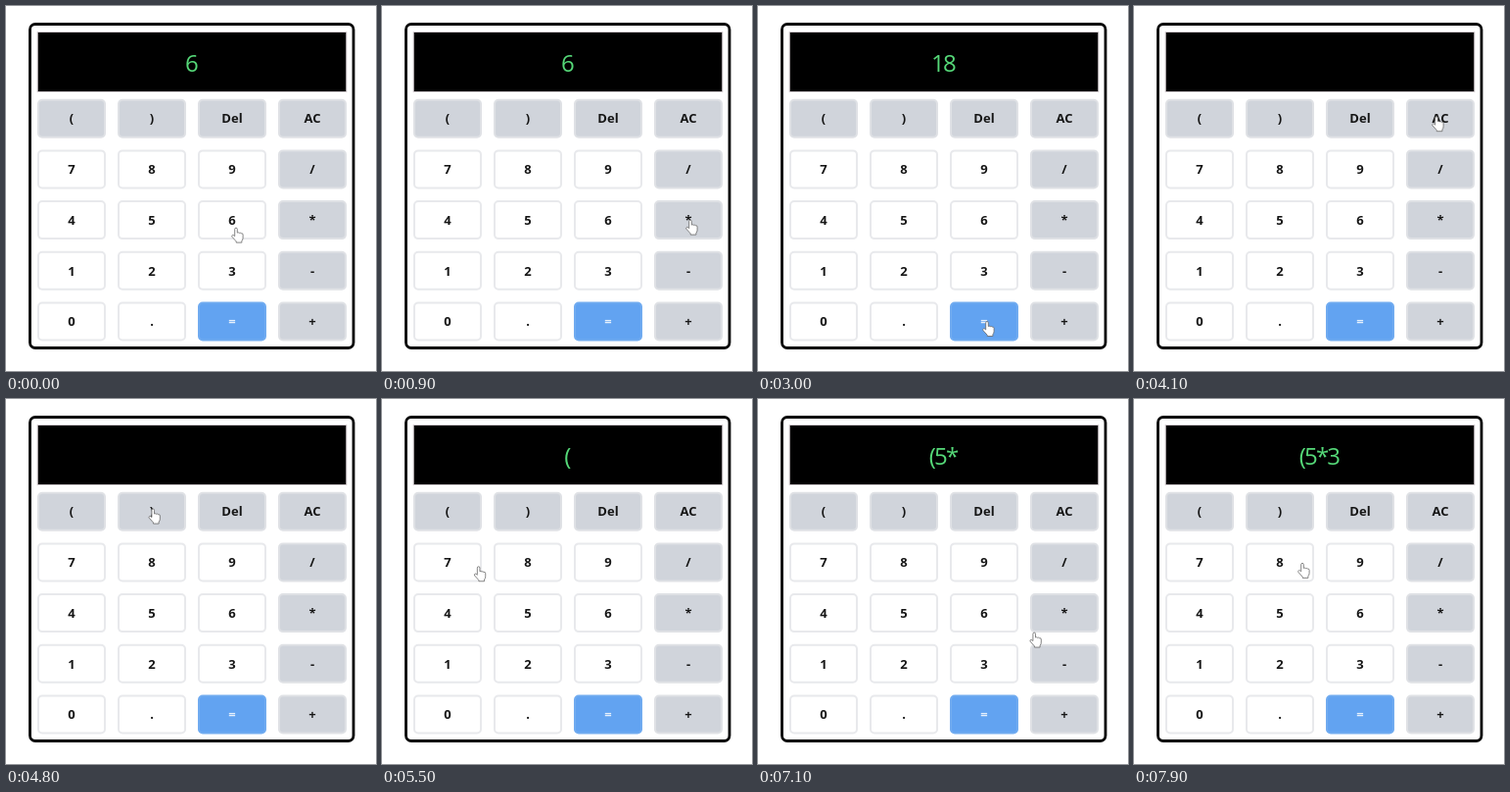
These frames come from a looping animation (378 by 372 pixels, 8 s). An HTML page:

```html
<!DOCTYPE html>
<html lang="en">
<head>
<meta charset="utf-8">
<title>Calculator</title>
<style>
  html, body { margin: 0; width: 100%; height: 100%; overflow: hidden; background: #fff; }
  svg { display: block; width: 100vw; height: 100vh; }
  text { font-family: "Open Sans", "Noto Sans", sans-serif; text-anchor: middle; }
  .frame { fill: #fff; stroke: #000; stroke-width: 2.8; }
  .screen { fill: #000; stroke: #d3ccd0; }
  #readout { font-size: 24px; letter-spacing: -1.8px; fill: #55d878; }
  .key rect { fill: #fff; stroke: #e8e9ec; stroke-width: 2; }
  .key text { font-size: 13px; font-weight: 700; fill: #161616; }
  .key.gray rect { fill: #d0d4db; stroke: #dfe1e5; }
  .key.blue rect { fill: #62a3f1; stroke: #70abf0; }
  .key.blue text { fill: #e4effc; }
  #cursor path { fill: #fff; stroke: #666; stroke-width: .8; stroke-linejoin: round; }
</style>
</head>
<body>
<svg viewBox="0 0 378 372">
  <rect class="frame" x="24.5" y="18.5" width="330.5" height="330" rx="5.5"/>
  <rect class="screen" x="32.2" y="26.5" width="315.6" height="61"/>
  <text id="readout" x="189" y="66.8"></text>
  <g id="keys"></g>
  <g id="cursor">
    <path id="hand" d="M-1.3 8V1.3a1.3 1.3 0 0 1 2.6 0V5q1-.7 2 .2 1-.5 2 .4 1.8-.3 1.8 1.4V10q0 2-1.2 3.2V15H.2v-1.2L-4 9.2q-.8-1.4.5-1.9 1-.2 2.2 1.2z"/>
    <path id="arrow" d="M0 0V10L2.3 8 4 11.8 5.6 11 4 7.4H7z"/>
  </g>
</svg>
<script>
  const LOOP = 8000, STEP = 100;
  const KEY_W = 70, KEY_H = 40, PITCH_X = 82, PITCH_Y = 51.7;
  const rows = ['( ) Del AC', '7 8 9 /', '4 5 6 *', '1 2 3 -', '0 . = +'];
  const byId = id => document.getElementById(id);

  // Key positions are centres.
  const keys = rows.flatMap((row, r) => row.split(' ').map((label, c) => ({
    label,
    x: 67 + PITCH_X * c,
    y: 114.7 + PITCH_Y * r,
    kind: label === '=' ? 'blue' : r === 0 || c === 3 ? 'gray' : ''
  })));

  byId('keys').innerHTML = keys.map(({ label, x, y, kind }) => `
    <g class="key ${kind}">
      <rect x="${x - KEY_W / 2 + 1}" y="${y - KEY_H / 2 + 1}"
            width="${KEY_W - 2}" height="${KEY_H - 2}" rx="4"/>
      <text x="${x}" y="${y + 4.7}">${label}</text>
    </g>`).join('');

  // Each visit travels from `leave` to `arrive`, then presses the key.
  // `at` offsets the pointer from the key centre, `bow` curves the way there.
  const visits = [
    { key: '6', leave: 0, arrive: 0, press: 0, at: [4, 8] },
    { key: '*', leave: 0, arrive: 900, press: 1000, at: [2, 0] },
    { key: '3', leave: 1100, arrive: 1600, press: 1800, at: [8, 0] },
    { key: '=', leave: 1800, arrive: 2600, press: 2600, at: [3, 0], bow: -.3 },
    { key: 'AC', leave: 3000, arrive: 3800, press: 4100, at: [-4, -2] },
    { key: '(', leave: 4200, arrive: 5200, press: 5400, at: [-3, -3] },
    { key: '5', leave: 5300, arrive: 5700, press: 6000, at: [1, -2], bow: .08 },
    { key: '*', leave: 5900, arrive: 6800, press: 7000, at: [3, 0], bow: .13 },
    { key: '3', leave: 6900, arrive: 7400, press: 7800, at: [-11, 5] },
    { key: '8', leave: 7700, arrive: 7900, press: LOOP, at: [23, 1] }
  ];

  function target({ key, at }) {
    const { x, y } = keys.find(k => k.label === key);
    return [x + at[0], y + at[1]];
  }

  function pointerAt(t) {
    const i = visits.findLastIndex(v => v.leave <= t && v.arrive <= t || v.leave < t);
    const visit = visits[i], [x, y] = target(visit);
    const [fromX, fromY] = target(visits[Math.max(0, i - 1)]);
    const u = visit.arrive ? Math.min(1, (t - visit.leave) / (visit.arrive - visit.leave)) : 1;
    const ease = u * u * (3 - 2 * u);
    const side = 4 * ease * (1 - ease) * (visit.bow || 0);
    const dx = x - fromX, dy = y - fromY;
    return [fromX + dx * ease - dy * side, fromY + dy * ease + dx * side];
  }

  function press(shown, key) {
    if (key === 'AC') return '';
    if (key !== '=') return shown + key;
    return String(shown.split('*').reduce((a, b) => a * b));
  }

  const readoutAt = t => visits.filter(v => v.press <= t)
    .reduce((shown, v) => press(shown, v.key), '');

  const overKey = (px, py) => keys.some(({ x, y }) =>
    Math.abs(px - x) < KEY_W / 2 - 1 && Math.abs(py - y) < KEY_H / 2);

  function draw(now) {
    const t = Math.floor(now % LOOP / STEP) * STEP;
    const [x, y] = pointerAt(t);
    const hand = overKey(x, y);
    byId('readout').textContent = readoutAt(t);
    byId('cursor').setAttribute('transform', `translate(${x} ${y})`);
    byId('hand').style.display = hand ? '' : 'none';
    byId('arrow').style.display = hand ? 'none' : '';
  }

  const start = performance.now();
  function tick() {
    draw(performance.now() - start);
    requestAnimationFrame(tick);
  }
  tick();
</script>
</body>
</html>
```
